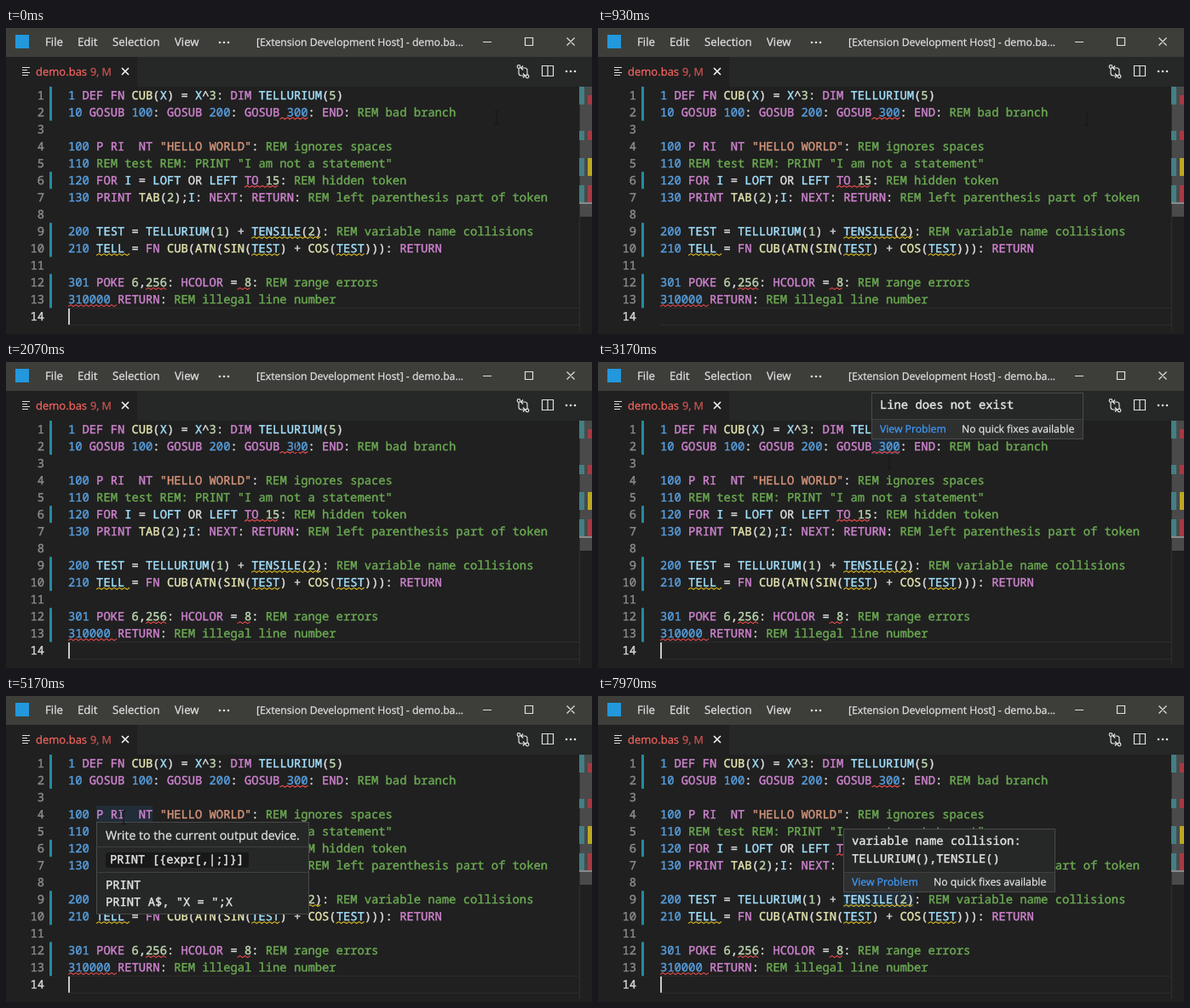
An HTML page for the animation above (8000 ms loop, 688 px wide and 360 px high).

```html
<!DOCTYPE html>
<html lang="en">
<head>
<meta charset="utf-8">
<title>BASIC editor hovers</title>
<style>
html, body { margin: 0; width: 100%; height: 100%; overflow: hidden; background: #202020; }
svg { display: block; width: 688px; height: 360px; }
text { white-space: pre; text-rendering: geometricPrecision; }
text, tspan { fill: currentColor; stroke: currentColor; }
.mono { font: 13.8px "Noto Sans Mono", monospace; color: #e6e6e6; stroke-width: .4px; }
.ui { font: 12.2px "Open Sans", "Noto Sans", sans-serif; color: #e2e2e2; stroke-width: .25px; }
.menu { font-size: 13.2px; }
.icon { fill: none; stroke: #e0e0e0; stroke-width: 1.2; }
</style>
</head>
<body>
<svg id="stage" viewBox="0 0 688 360" xmlns="http://www.w3.org/2000/svg"></svg>
<script>
const LOOP = 8000, CH = 8.28, LEFT = 73, TOP = 69, ROW = 20.03;

const lines = [
  '1 DEF FN CUB(X) = X^3: DIM TELLURIUM(5)',
  '10 GOSUB 100: GOSUB 200: GOSUB 300: END: REM bad branch',
  '',
  '100 P RI  NT "HELLO WORLD": REM ignores spaces',
  '110 REM test REM: PRINT "I am not a statement"',
  '120 FOR I = LOFT OR LEFT TO 15: REM hidden token',
  '130 PRINT TAB(2);I: NEXT: RETURN: REM left parenthesis part of token',
  '',
  '200 TEST = TELLURIUM(1) + TENSILE(2): REM variable name collisions',
  '210 TELL = FN CUB(ATN(SIN(TEST) + COS(TEST))): RETURN',
  '',
  '301 POKE 6,256: HCOLOR = 8: REM range errors',
  '310000 RETURN: REM illegal line number',
  ''
];

// [pattern, colour], first match wins
const rules = [
  [/^\d+|(?<=GOSUB )\d+/y, '#589fdf'],
  [/REM.*/y, '#6cab53'],
  [/"[^"]*"/y, '#d6967c'],
  [/P RI {2}NT|(DEF|FN|DIM|GOSUB|END|FOR|TO|PRINT|NEXT|RETURN|POKE|HCOLOR)\b/y, '#d084d0'],
  [/(CUB|TAB|ATN|SIN|COS)\b/y, '#e6e6b2'],
  [/OR\b/y, '#e0e0e0'],
  [/[A-Z]+/y, '#a4e2ff'],
  [/\d+/y, '#bfd8b0'],
  [/[^\sA-Z\d"]/y, '#e0e0e0']
];

const esc = s => s.replace(/&/g, '&amp;').replace(/</g, '&lt;');
const col = i => +(LEFT + i * CH).toFixed(2);
const rowY = r => +(TOP + (r - 1) * ROW).toFixed(2);
const rect = (x, y, w, h, fill, extra = '') =>
  `<rect x="${x}" y="${y}" width="${w}" height="${h}" fill="${fill}" ${extra}/>`;
const text = (x, y, s, cls, extra = '') =>
  `<text x="${x}" y="${y}" class="${cls}" ${extra}>${esc(s)}</text>`;
const path = (d, extra = '') => `<path class="icon" d="${d}" ${extra}/>`;
const dots = (x, y, gap) => [0, 1, 2].map(i =>
  `<circle cx="${x + i * gap}" cy="${y}" r="1.3" fill="#e0e0e0"/>`).join('');

function codeLine(src, n) {
  const y = rowY(n) + 15;
  const out = text(45, y, String(n), 'mono',
    `text-anchor="end" style="color:${n === 14 ? '#d8d8d8' : '#8c8c8c'}"`);
  let spans = '';
  for (let i = 0; i < src.length;) {
    let len = 1;
    for (const [re, color] of rules) {
      re.lastIndex = i;
      const m = re.exec(src);
      if (!m) continue;
      len = m[0].length;
      spans += `<tspan x="${col(i)}" style="color:${color}">${esc(m[0])}</tspan>`;
      break;
    }
    i += len;
  }
  return out + `<text y="${y}" class="mono">${spans}</text>`;
}

function squiggle(row, from, to, color) {
  const y = rowY(row) + 17.3, end = col(to);
  let x = col(from), d = `M${x} ${y + 1}`, up = true;
  while (x + 3 <= end) {
    x += 3;
    d += `L${x.toFixed(2)} ${y + (up ? -1 : 1)}`;
    up = !up;
  }
  return `<path d="${d}" fill="none" stroke="${color}" stroke-width="1.1"/>`;
}

function titleBar() {
  const menus = [[46, 'File'], [84, 'Edit'], [125, 'Selection'], [198, 'View']];
  return rect(0, 0, 688, 34, '#3d3e3a') +
    rect(11, 8, 16, 16, '#2398dc') +
    menus.map(([x, s]) => text(x, 21, s, 'ui menu')).join('') +
    dots(251, 17, 5) +
    text(294, 21, '[Extension Development Host] - demo.ba...', 'ui') +
    path('M560 16.5h10M609.5 11.5h9v9h-9zM658.5 11.5l9 9M667.5 11.5l-9 9');
}

function tabBar() {
  return rect(0, 34, 688, 35, '#262727') + rect(0, 34, 154, 35, '#202020') +
    path('M19 46.5h9M19 49.5h6M19 52.5h9M19 55.5h7') +
    text(35, 56, 'demo.bas', 'ui', 'style="font-size:13px;color:#f4655f"') +
    text(99, 55.5, '9, M', 'ui', 'style="font-size:12.6px;color:#d05550"') +
    path('M136 47l8 8M144 47l-8 8', 'style="stroke:#fff;stroke-width:1.5"') +
    path('M602 47v6q0 3 3 3h4M607 53.5l2.5 2.5l-2.5 2.5M612 55v-5q0-3-3-3h-4M607 44.5l-2.5 2.5l2.5 2.5') +
    '<circle class="icon" cx="602" cy="45.5" r="1.8"/><circle class="icon" cx="612" cy="57" r="1.8"/>' +
    path('M629.5 44.5h13v12h-13zM636 44.5v12') + dots(658, 51, 5);
}

function ruler() {
  const teal = '#437f86', red = '#a63a44', yellow = '#bba823';
  return rect(673, 69, 1, 287, '#303030') + rect(674, 69, 14, 153, '#4a4a4a') +
    [[69, 21], [121, 11], [153, 21], [185, 21]].map(([y, h]) => rect(673, y, 6, h, teal)).join('') +
    [[79, 11, red], [121, 11, red], [153, 21, yellow], [185, 20, red]]
      .map(([y, h, c]) => rect(683, y, 5, h, c)).join('') +
    rect(673, 205, 15, 2, '#8a8a8a');
}

function box(x, y, w, h) {
  return rect(x + .5, y + .5, w - 1, h - 1, '#262727', 'stroke="#4a4a4a"');
}

function problem(x, y, w, h, msgs) {
  const foot = y + h - 24;
  return box(x, y, w, h) + rect(x + 1, foot, w - 2, 23, '#2e2f2f') +
    rect(x + 1, foot, w - 2, 1, '#404040') +
    msgs.map((s, i) => text(x + 10, y + 19 + i * 20.5, s, 'mono')).join('') +
    text(x + 10, y + h - 8, 'View Problem', 'ui', 'style="color:#3d9cff"') +
    text(x + 106, y + h - 8, 'No quick fixes available', 'ui');
}

function help() {
  return box(106, 148, 250, 109) +
    text(117, 168.5, 'Write to the current output device.', 'ui', 'style="font-size:14.2px"') +
    rect(107, 177, 248, 1, '#404040') + rect(107, 207, 248, 1, '#404040') +
    rect(117, 184, 168, 18, '#181818', 'rx="3"') +
    text(122, 197, 'PRINT [{expr[,|;]}]', 'mono') +
    text(117, 227, 'PRINT', 'mono') +
    text(117, 247, 'PRINT A$, "X = ";X', 'mono');
}

const RED = '#f14c4c', YELLOW = '#d4b420';
const marks = [
  [2, 30, 34, RED], [6, 25, 30, RED], [9, 26, 36, YELLOW], [10, 4, 9, YELLOW],
  [10, 26, 30, YELLOW], [10, 38, 42, YELLOW], [12, 11, 14, RED], [12, 24, 26, RED],
  [13, 0, 7, RED]
];
const changed = [[1, 2], [6, 1], [9, 2], [12, 2]];
const glow = (row, from, to) =>
  rect(col(from), rowY(row), (to - from) * CH, 20, '#264f78', 'opacity=".28"');

const hovers = [
  { from: 2400, to: 3260, back: glow(2, 30, 34),
    tip: problem(321, 36, 249, 55, ['Line does not exist']) },
  { from: 4200, to: 6500, back: glow(4, 4, 12), tip: help() },
  { from: 7840, to: LOOP, back: glow(9, 26, 36),
    tip: problem(288, 156, 249, 75, ['variable name collision:', 'TELLURIUM(),TENSILE()']) }
];

const stage = document.getElementById('stage');
stage.innerHTML =
  rect(0, 0, 688, 360, '#202020') + titleBar() + tabBar() +
  rect(LEFT, 329, 600, 1, '#2b2b2b') + rect(LEFT, 349, 600, 1, '#2b2b2b') +
  changed.map(([r, n]) => rect(51, rowY(r), 3, n * ROW, '#238ba0')).join('') +
  hovers.map((h, i) => `<g id="back${i}">${h.back}</g>`).join('') +
  lines.map((s, i) => codeLine(s, i + 1)).join('') +
  marks.map(m => squiggle(...m)).join('') + ruler() +
  rect(LEFT, 330, 2, 19, '#c8c8c8', 'id="caret"') +
  hovers.map((h, i) => `<g id="tip${i}">${h.tip}</g>`).join('') +
  '<path id="mouse" d="M-3-8q3 0 3 2q0-2 3-2M0-6V6M-3 8q3 0 3-2q0 2 3 2" fill="none" stroke="#16191b" stroke-width="1.2"/>';

const $ = id => document.getElementById(id);
hovers.forEach((h, i) => { h.backEl = $('back' + i); h.tipEl = $('tip' + i); });
const caret = $('caret'), mouse = $('mouse');

// time, x, y of the pointer
const track = [
  [0, 576, 105], [930, 574, 107], [1150, 574, 107], [2000, 341, 98], [3020, 341, 98],
  [3170, 342, 118], [3900, 138, 143], [6470, 138, 143], [6700, 195, 160],
  [7500, 320, 241], [LOOP, 320, 241]
];

function pointer(t) {
  const i = track.findIndex(k => k[0] > t);
  const [t0, x0, y0] = track[i - 1], [t1, x1, y1] = track[i];
  const p = (t - t0) / (t1 - t0), e = p * p * (3 - 2 * p);
  return [x0 + (x1 - x0) * e, y0 + (y1 - y0) * e];
}

function draw(t) {
  caret.style.display = (t + 50) % 1000 < 500 ? '' : 'none';
  for (const h of hovers) {
    const on = t >= h.from && t < h.to;
    h.backEl.style.display = h.tipEl.style.display = on ? '' : 'none';
    h.tipEl.style.opacity = Math.max(0, Math.min(1, (t - h.from) / 100));
  }
  const [x, y] = pointer(t);
  mouse.setAttribute('transform', `translate(${x.toFixed(1)} ${y.toFixed(1)})`);
}

const start = performance.now();
function tick() {
  draw((performance.now() - start) % LOOP);
  requestAnimationFrame(tick);
}
tick();
</script>
</body>
</html>
```
